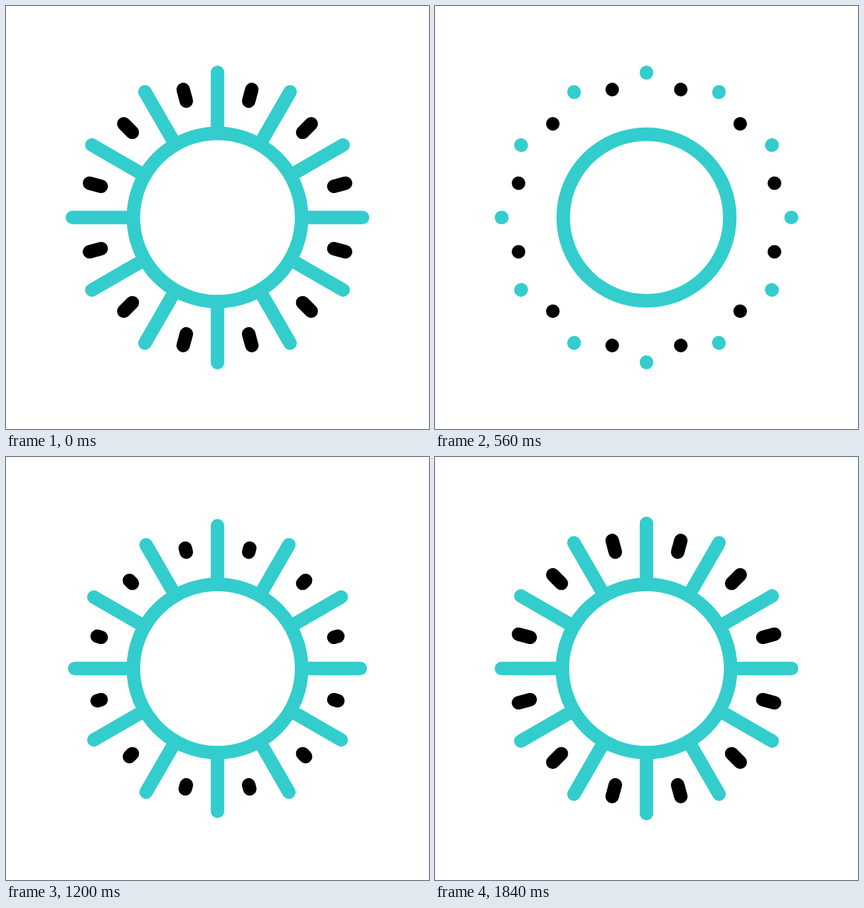
Write an HTML page that moves like this. It is 640 px wide and 640 px high and loops after 2400 ms.

```html
<!DOCTYPE html>
<html lang="en">
<head>
<meta charset="utf-8">
<title>Shining sun</title>
<style>
  html, body { margin: 0; width: 100%; height: 100%; overflow: hidden; background: #fff; }
  svg { display: block; width: 100vw; height: 100vh; }
  g { fill: none; stroke-width: 20.4; stroke-linecap: round; }
  .teal { stroke: #33cdcd; }
  .black { stroke: #000; }
</style>
</head>
<body>
<svg viewBox="0 0 640 640">
  <g class="black" id="dashes" transform="translate(320 320)"></g>
  <g class="teal" id="rays" transform="translate(320 320)"><circle id="ring" r="127.3"/></g>
</svg>
<script>
const LOOP = 2400, STEP = 40;
const REGROW = 600, SWAP = 1040, GROW_TIME = 800;
const RING = 127.3, RING_SMALL = 98.8;
const ring = document.getElementById('ring');

const mix = (a, b, p) => a + (b - a) * p;

// Eased progress along cubic-bezier(x1, 0, x2, 1)
function ease(t, start, length, x1, x2) {
  const x = Math.min(1, Math.max(0, (t - start) / length));
  if (x === 0 || x === 1) return x;
  let lo = 0, hi = 1;
  for (let i = 0; i < 24; i++) {
    const s = (lo + hi) / 2, r = 1 - s;
    if (3 * r * r * s * x1 + 3 * r * s * s * x2 + s ** 3 < x) lo = s; else hi = s;
  }
  return lo * lo * (3 - 2 * lo);
}

function addLine(group, angle, inner, outer) {
  const el = document.createElementNS('http://www.w3.org/2000/svg', 'line');
  el.setAttribute('transform', `rotate(${angle})`);
  document.getElementById(group).append(el);
  return { el, inner, outer };
}

function setSpan(line, from, to) {
  line.el.setAttribute('y1', -from);
  line.el.setAttribute('y2', -to - 0.01);
}

const rays = [], dots = [], dashes = [];
for (let i = 0; i < 12; i++) {
  const inner = i === 2 ? 131 : 128;
  rays.push(addLine('rays', i * 30, inner, 219.5));
  dots.push(addLine('rays', i * 30, inner, 219.5));
  dashes.push(addLine('dashes', i * 30 + 15, 182.2, 200.5));
}

function draw(t) {
  const leave = ease(t, 0, 600, 0.3, 0.57);
  const rayGrow = ease(t, REGROW, GROW_TIME, 0.19, 0.2);
  const dashGrow = ease(t, SWAP, GROW_TIME, 0.19, 0.2);
  const shrink = ease(t, 0, 285, 1 / 3, 2 / 3) - ease(t, 285, 315, 1 / 3, 2 / 3);

  ring.setAttribute('r', mix(RING, RING_SMALL, shrink));

  for (const d of dots) {
    d.el.style.display = t < SWAP ? '' : 'none';
    setSpan(d, mix(d.inner, d.outer, leave), d.outer);
  }
  for (const r of rays) {
    r.el.style.display = t < REGROW ? 'none' : '';
    setSpan(r, r.inner, mix(r.inner, r.outer, rayGrow));
  }
  for (const d of dashes) {
    if (t < SWAP) setSpan(d, mix(d.inner, d.outer, leave), d.outer);
    else setSpan(d, d.inner, mix(d.inner, d.outer, dashGrow));
  }
}

const start = performance.now();
function tick() {
  const t = (performance.now() - start) % LOOP;
  draw(Math.floor((t + 1) / STEP) * STEP % LOOP);
  requestAnimationFrame(tick);
}
tick();
</script>
</body>
</html>
```
